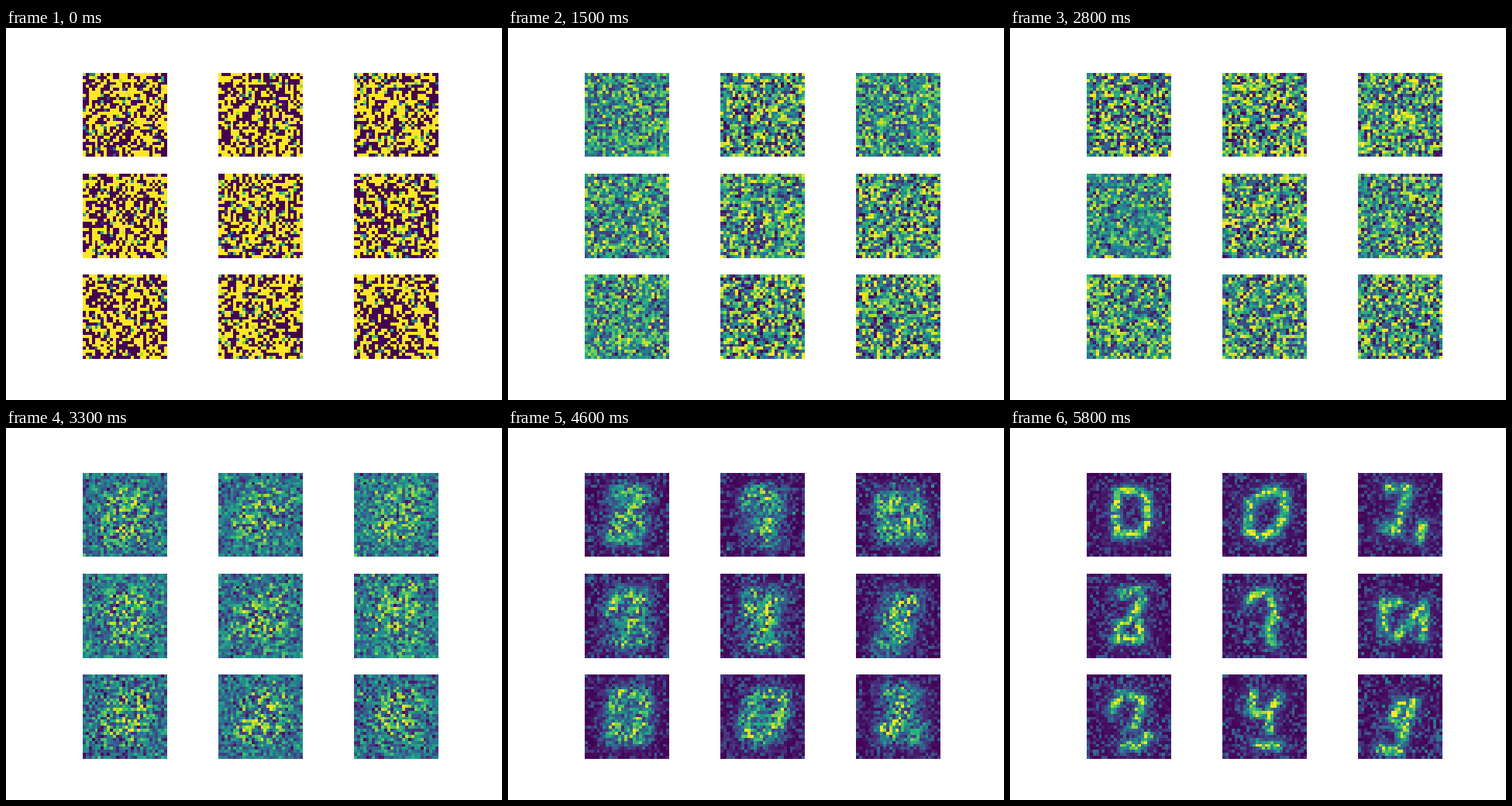
An HTML page with a canvas that plays this animation: 640x480 px, repeating every 5.9 s.

```html
<!DOCTYPE html>
<html lang="en">
<head>
<meta charset="utf-8">
<title>Noise to digits</title>
<style>
  html, body { margin: 0; width: 100%; height: 100%; overflow: hidden; background: #fff; }
  canvas { display: block; }
</style>
</head>
<body>
<canvas id="stage" width="640" height="480"></canvas>
<script>
const ctx = document.getElementById('stage').getContext('2d');
const STEP = 100, STEPS = 59, N = 28;
const LEFT = [99, 274, 449];
const ROWS = [[58, 166], [188, 297], [318, 427]];

// Strokes on the 28 x 28 grid: points split by spaces, strokes by "|"
const GLYPHS = [
  '10,6 15,5 19,7 20,16 17,20 10,20 9,12 10,6',
  '16,5 20,7 20,14 17,19 12,21 8,19 9,9 16,5',
  '10,4.5 16,4.5 14,13|13,16 8,18 13,19|21,17 20,21',
  '11,6 17,5 18,8 14,14 10,17 9,21 17,21 17,16',
  '8,9 11,6 15,6 17,12 15,18 16,23',
  '8,9 8,18|12,20 16,17 20,11|13,9 9,10|21,10 21,20',
  '11,6 8,11|13,6 18,8 15,17|12,23 17,23 20,20',
  '10,6 9,12 15,13|18,7 15,12 15,18|11,23 18,23',
  '17,9 13,9 11,14 15,18 14,21|18,9 15,16|7,24 13,25'
].map(parseGlyph);

const VIRIDIS = [
  [68, 1, 84], [71, 45, 123], [59, 82, 139], [44, 114, 142], [33, 145, 140],
  [40, 174, 128], [94, 201, 98], [173, 220, 48], [253, 231, 37]
];
const PALETTE = Array.from({ length: 256 }, (_, i) => {
  const p = i / 255 * 8, k = Math.min(7, Math.floor(p));
  const rgb = VIRIDIS[k].map((c, j) => Math.round(mix(c, VIRIDIS[k + 1][j], p - k)));
  return `rgb(${rgb})`;
});

function mix(a, b, t) { return a + (b - a) * t; }
function clamp(v) { return Math.max(0, Math.min(1, v)); }
function ramp(a, b, v) { return clamp((v - a) / (b - a)); }

function parseGlyph(text) {
  return text.split('|').flatMap(stroke => {
    const pts = stroke.split(' ').map(p => p.split(',').map(Number));
    return pts.slice(1).map((p, i) => [...pts[i], ...p]);
  });
}

function random(seed) {
  let s = Math.imul(seed + 1, 0x9E3779B1);
  return () => {
    s = (s + 0x6D2B79F5) | 0;
    let t = Math.imul(s ^ (s >>> 15), 1 | s);
    t = (t + Math.imul(t ^ (t >>> 7), 61 | t)) ^ t;
    return ((t ^ (t >>> 14)) >>> 0) / 4294967296;
  };
}

function distance(segments, x, y) {
  let best = 1e9;
  for (const [ax, ay, bx, by] of segments) {
    const dx = bx - ax, dy = by - ay;
    const t = clamp(((x - ax) * dx + (y - ay) * dy) / (dx * dx + dy * dy));
    best = Math.min(best, Math.hypot(x - ax - t * dx, y - ay - t * dy));
  }
  return best;
}

// Returns a function giving the value 0..1 of each cell
function panelField(n, panel) {
  const rnd = random(n * 9 + panel);
  const spread = rnd(), soft = rnd(), tilt = rnd() * 0.25;
  const gain = 0.95 + 0.25 * spread + (5 + 9 * spread) * Math.exp(-n / 1.8);
  const blend = n < 4 ? 0 : soft * 0.6;
  const focus = ramp(28, 38, n);
  const late = ramp(38, 58, n);
  const glyph = GLYPHS[(panel + (STEPS - 1 - n) * 4) % 9];
  const blur = mix(3.4, 1.55, late);
  const haze = mix(0.45 + 0.35 * soft, 0.3 + 0.14 * soft, ramp(38, 46, n));
  const haze2 = mix(1.6, 3.2, ramp(38, 46, n));

  return (x, y) => {
    const u = rnd(), w = rnd(), g = rnd();
    const flat = clamp(0.5 + (mix(u, (u + w) / 2, blend) - 0.485) * gain);
    if (!focus) return flat;

    const dy = y - 13.5, dx = x - 14 + dy * tilt;
    const blob = Math.exp(-((dx / mix(8.3, 6.5, late)) ** 4) - ((dy / 9.8) ** 4));
    const d = distance(glyph, x, y);
    const line = Math.exp(-((d / blur) ** 2)) + 0.16 * Math.exp(-((d / 4.5) ** 2));
    const shape = mix(blob * 0.92, line, late ** 0.7);
    const level = mix(1.1 * u ** 1.1, 0.28 + 0.75 * u, late);
    const drawn = clamp(shape * level + haze * g ** haze2 * (1 - 0.6 * shape)
      + (w > 0.985 ? 0.3 * u : 0));
    return mix(flat, drawn, focus);
  };
}

function drawPanel(n, panel) {
  const x0 = LEFT[panel % 3], [y0, y1] = ROWS[Math.floor(panel / 3)];
  const field = panelField(n, panel);
  const edgeX = i => x0 + Math.round(i * 109 / N);
  const edgeY = i => y0 + Math.round(i * (y1 - y0) / N);
  for (let r = 0; r < N; r++) {
    for (let c = 0; c < N; c++) {
      ctx.fillStyle = PALETTE[Math.round(field(c, r) * 255)];
      const x = edgeX(c), y = edgeY(r);
      ctx.fillRect(x, y, edgeX(c + 1) - x, edgeY(r + 1) - y);
    }
  }
}

function draw(n) {
  ctx.fillStyle = '#fff';
  ctx.fillRect(0, 0, 640, 480);
  for (let panel = 0; panel < 9; panel++) drawPanel(n, panel);
}

const start = performance.now();
let shown = -1;
function tick() {
  const n = Math.floor((performance.now() - start) / STEP) % STEPS;
  if (n !== shown) draw(shown = n);
  requestAnimationFrame(tick);
}
tick();
</script>
</body>
</html>
```
